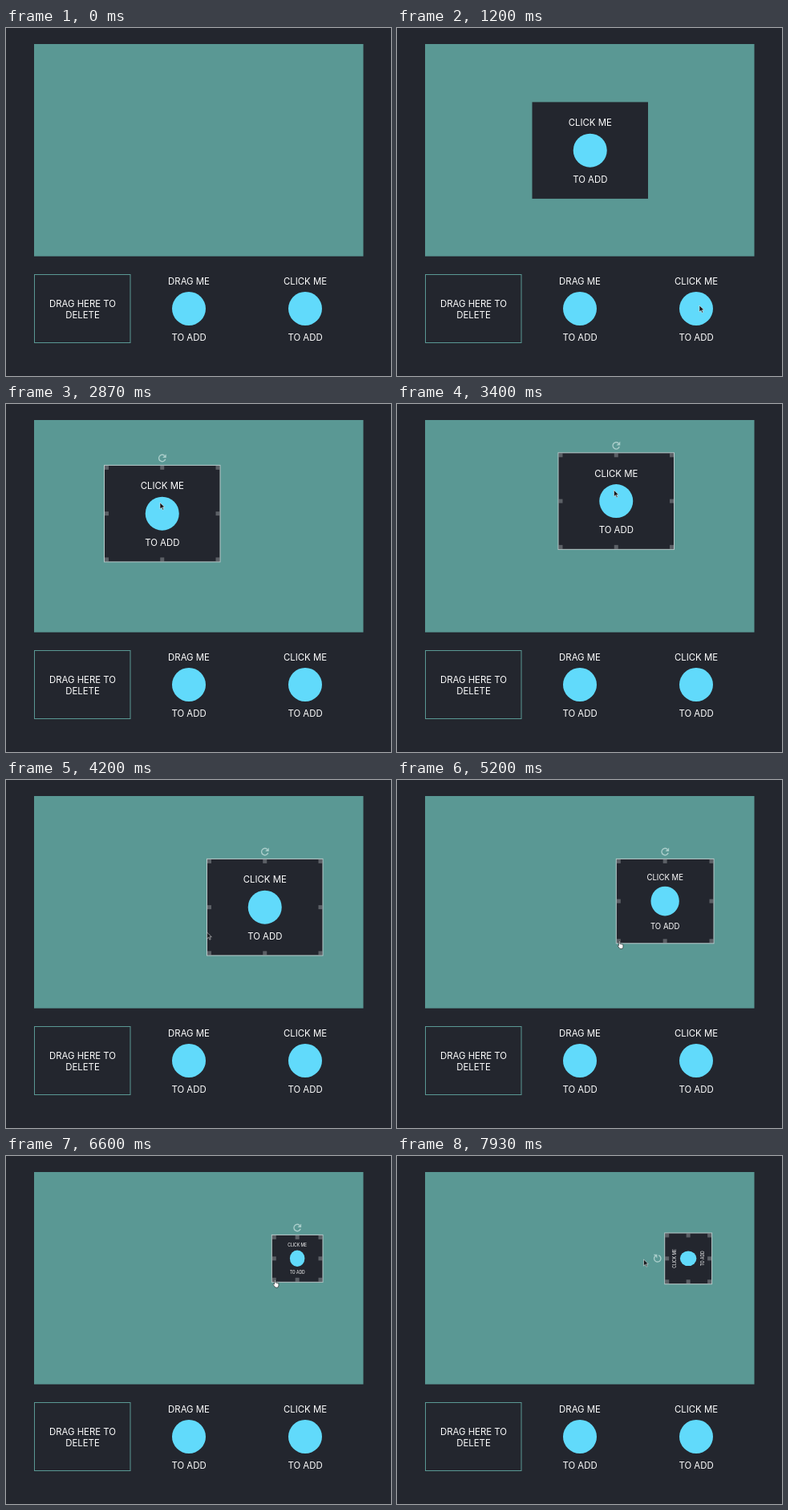
An HTML page for the animation above (8000 ms loop, 480x434 px).

```html
<!DOCTYPE html>
<html lang="en">
<head>
<meta charset="utf-8">
<title>Drag, resize and rotate</title>
<style>
  html, body { margin: 0; width: 100%; height: 100%; overflow: hidden; background: #23262e; }
  svg { display: block; width: 480px; height: 434px; }
  text { font: 11.4px Inter, "Liberation Sans", sans-serif; fill: #fff; text-anchor: middle; }
  .icon { fill: #61dafb; }
  .edge { fill: none; stroke: #b9caca; }
  .grip { fill: #a2a6ab; fill-opacity: .45; }
  .spin { fill: none; stroke: #a9cdca; stroke-width: 1.4; }
</style>
</head>
<body>
<svg viewBox="0 0 480 434">
  <defs>
    <g id="badge">
      <circle class="icon" r="21"/>
      <text y="39.9">TO ADD</text>
    </g>
    <g id="clickTile">
      <text y="-30.2">CLICK ME</text>
      <use href="#badge"/>
    </g>
  </defs>
  <rect x="35" y="20" width="410.5" height="264.7" fill="#5a9894"/>
  <rect x="35.5" y="307.5" width="119.5" height="85" fill="none" stroke="#5a9894"/>
  <text x="95.5" y="347.9">DRAG HERE TO</text>
  <text x="95.5" y="361.9">DELETE</text>
  <g transform="translate(228 350)">
    <text y="-30.2">DRAG ME</text>
    <use href="#badge"/>
  </g>
  <use href="#clickTile" x="373" y="350"/>

  <g id="item">
    <g id="body">
      <rect x="-72.25" y="-60.25" width="144.5" height="120.5" fill="#23262e"/>
      <use href="#clickTile"/>
    </g>
    <g id="frame">
      <rect id="edge" class="edge"/>
      <g id="spin">
        <path class="spin" d="M4 1.4A4.2 4.2 0 1 1 2.9-3"/>
        <path d="M5-5V-.3H.3z" fill="#a9cdca"/>
      </g>
    </g>
  </g>
  <g id="cursor" stroke-linejoin="round">
    <path id="arrow" d="M0 0v8l2-1.8 1.4 3 1.3-.6-1.4-2.9h2.6z" fill="#16181c" stroke="#fff" stroke-width=".5"/>
    <path id="hand" d="M1 .8c0-1 1.4-1 1.4 0v3l4 1v3L5.5 10H2.4L-.4 6.4l.6-.8.8.4z" fill="#fff" stroke="#16181c" stroke-width=".6"/>
  </g>
</svg>
<script>
const LOOP = 8000, STEP = 1000 / 15;
const W = 144.5, H = 120.5, RIGHT = 395, TOP = 98.4;
const ENTER = 530, ADD = 1199, SELECT = 1930, GRAB = 2200, DROP = 4000;
const REACH = 4660, RESIZE = 4870, RELEASE = 6640, ROTATE = 7370;

const el = id => document.getElementById(id);
const set = (node, attrs) => { for (const k in attrs) node.setAttribute(k, attrs[k]); };
const show = (node, on) => { node.style.display = on ? "" : "none"; };
const clamp = (v, lo, hi) => Math.min(Math.max(v, lo), hi);
const ease = u => u * u * (3 - 2 * u);

// Eased cursor moves, bowed upwards by `lift`
const moves = [
  { from: ENTER, to: 930, x: 377, y: 346, lift: 14 },
  { from: 1270, to: SELECT, x: 253, y: 115, lift: 100 },
  { from: 2070, to: GRAB, x: 238, y: 139 },
  { from: GRAB, to: 2700, x: 192, y: 123 },
  { from: 2870, to: 3790, x: 320, y: 145, lift: 31 },
  { from: DROP, to: 4200, x: 250.5, y: 190 },
  { from: 4200, to: REACH, x: 252.5, y: 215.3 },
  { from: RESIZE, to: 5730, x: 322.5, y: 170.2 },
  { from: 5730, to: 6600, x: 333.5, y: 154 },
  { from: 6670, to: 7200, x: 362, y: 87 },
  { from: ROTATE, to: 7930, x: 307.5, y: 129, lift: 10 }
];

function tip(t) {
  let x = 467, y = 357;
  for (const m of moves) {
    const u = ease(clamp((t - m.from) / (m.to - m.from), 0, 1));
    x += (m.x - x) * u;
    y += (m.y - y) * u - (m.lift || 0) * Math.sin(Math.PI * u);
  }
  return [x, y];
}

function itemBox(t) {
  if (t < RESIZE) {
    const [x, y] = tip(clamp(t, GRAB, DROP));
    return { x: x - 69.5, y: y - 46.6, w: W, h: H };
  }
  const [x, y] = tip(Math.min(t, RELEASE));
  const left = x - 2.2, bottom = y + 3.3;
  return { x: left, y: TOP, w: RIGHT - left, h: bottom - TOP };
}

const grips = [];
for (const gx of [-1, 0, 1]) for (const gy of [-1, 0, 1]) {
  if (!gx && !gy) continue;
  const node = document.createElementNS("http://www.w3.org/2000/svg", "rect");
  set(node, { class: "grip", width: 5, height: 5 });
  el("frame").append(node);
  grips.push({ node, gx, gy });
}

function draw(t) {
  const [x, y] = tip(t);
  const { x: left, y: top, w, h } = itemBox(t);
  const cx = left + w / 2, cy = top + h / 2;
  const turn = t < ROTATE ? 0 :
    clamp(Math.atan2(x - cx, cy - y) * 180 / Math.PI, -90, 0);

  show(el("item"), t >= ADD);
  show(el("frame"), t >= SELECT);
  set(el("item"), { transform: `translate(${cx} ${cy}) rotate(${turn})` });
  set(el("body"), { transform: `scale(${w / W} ${h / H})` });
  set(el("edge"), { x: -w / 2, y: -h / 2, width: w, height: h });
  set(el("spin"), { transform: `translate(0 ${-h / 2 - 9})` });
  for (const { node, gx, gy } of grips)
    set(node, { x: gx * (w / 2 - 3) - 2.5, y: gy * (h / 2 - 3) - 2.5 });

  const hand = t >= REACH && t < 6740;
  show(el("cursor"), t >= ENTER);
  show(el("hand"), hand);
  show(el("arrow"), !hand);
  set(el("cursor"), { transform: `translate(${x} ${y})` });
}

function tick() {
  const t = performance.now() % LOOP;
  draw(Math.floor(t / STEP + .06) * STEP);
  requestAnimationFrame(tick);
}
tick();
</script>
</body>
</html>
```
